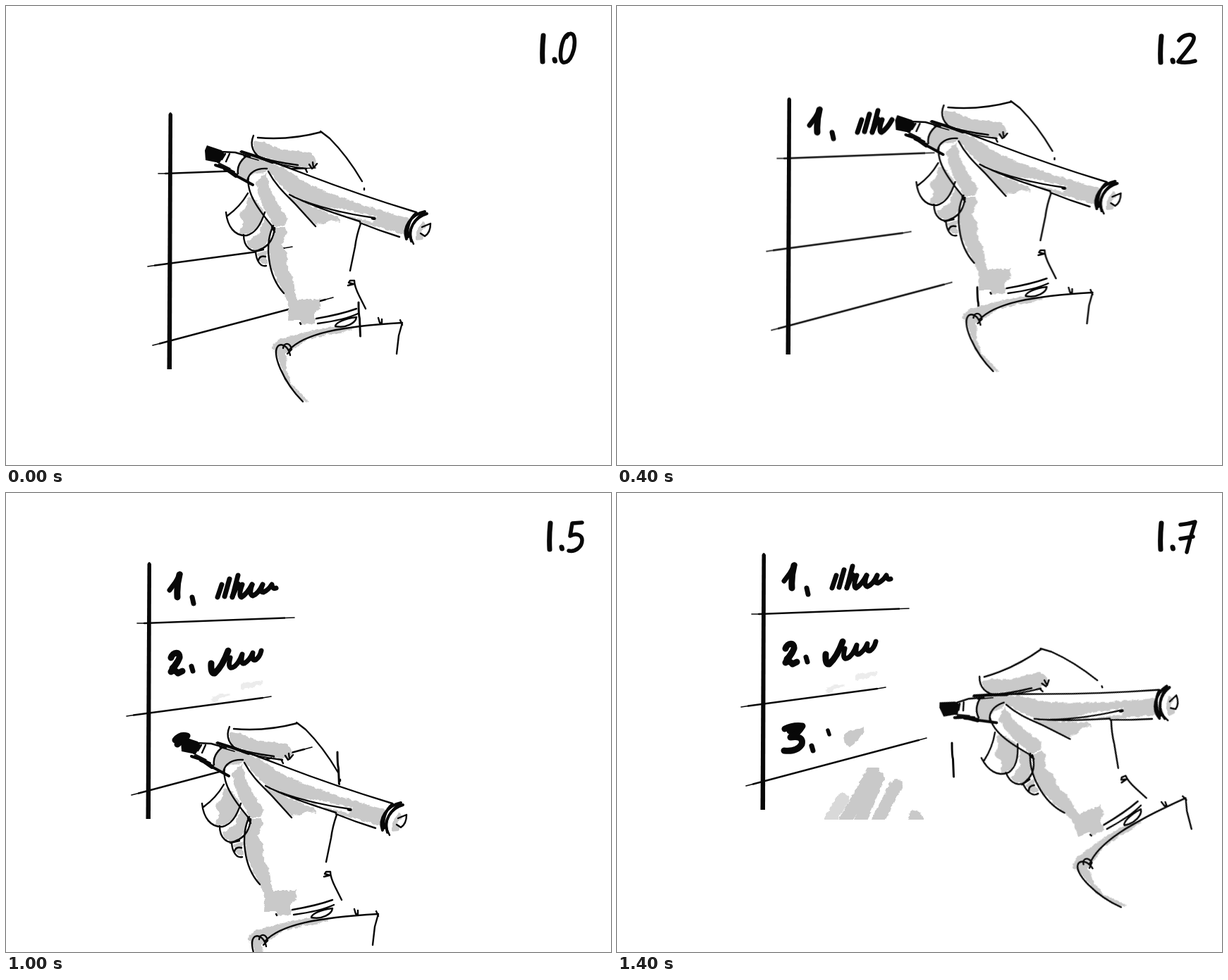
Animation of 858 by 652 pixels, one loop 1.6 s. Source, as an HTML page:

```html
<!DOCTYPE html>
<html lang="en">
<head>
<meta charset="utf-8">
<title>Writing hand</title>
<style>
html, body { margin: 0; width: 100%; height: 100%; overflow: hidden; background: #fff; }
svg { display: block; width: 858px; height: 652px; }
path { fill: none; stroke: #080808; stroke-width: 2.4; stroke-linecap: round; stroke-linejoin: round; }
.ink { fill: #080808; stroke: none; }
.paper { fill: #fff; stroke: none; }
.grey path { fill: #c9c9c9; stroke: none; }
.grey .pale { fill: #ececec; }
.smear path { stroke: #c9c9c9; stroke-width: 18; }
.smear .light { stroke: #d9d9d9; }
.brush path { stroke-width: 7; }
.brush .bold { stroke-width: 9; }
.brush .fine { stroke-width: 5.5; }
.thin { stroke-width: 1.6; }
.thick { stroke-width: 4; }

#table, #hand, #digits g, .s1, .s2, .s3, .s4, .s5, .s6 { animation: 1600ms step-end infinite; }
#table { animation-name: table; }
#hand { animation-name: hand; }
#digits g { opacity: 0; animation-name: digit; animation-delay: calc(var(--i) * 200ms); }
.s1 { animation-name: on1; }
.s2 { animation-name: on2; }
.s3 { animation-name: on3; }
.s4 { animation-name: on4; }
.s5 { animation-name: on5; }
.s6 { animation-name: on6; }
#lead { animation: lead 1600ms step-end infinite; }

@keyframes table {
  0% { transform: translate(1px, 53px); }
  12.5% { transform: translate(22px, 32px); }
  25% { transform: translate(12px, 31.5px); }
  37.5% { transform: translate(-46px, 32px); }
  50% { transform: translate(0, 0); }
  62.5% { transform: translate(-29px, 0); }
  75% { transform: translate(43px, -13.5px); }
  87.5%, 100% { transform: translate(-24px, -13px); }
}
@keyframes hand {
  0% { transform: translate(0, 0); }
  12.5% { transform: translate(12px, -36px); }
  25% { transform: translate(112.5px, -43px); }
  37.5% { transform: translate(-55px, 67px); }
  50% { transform: translate(103.5px, 34.5px); }
  62.5% { transform: translate(-34px, 148px); }
  75% { transform: translate(74px, 213.3px) rotate(-21deg); }
  87.5%, 100% { transform: translate(120.5px, 214.6px) rotate(-21deg); }
}
@keyframes lead {
  0% { transform: translate(-10px, -1px); }
  12.5%, 100% { transform: translate(0, 0); }
}
@keyframes digit { 0% { opacity: 1; } 12.5%, 100% { opacity: 0; } }
@keyframes on1 { 0% { opacity: 0; } 12.5%, 100% { opacity: 1; } }
@keyframes on2 { 0% { opacity: 0; } 25%, 100% { opacity: 1; } }
@keyframes on3 { 0% { opacity: 0; } 37.5%, 100% { opacity: 1; } }
@keyframes on4 { 0% { opacity: 0; } 50%, 100% { opacity: 1; } }
@keyframes on5 { 0% { opacity: 0; } 62.5%, 100% { opacity: 1; } }
@keyframes on6 { 0% { opacity: 0; } 75%, 100% { opacity: 1; } }
</style>
</head>
<body>
<svg viewBox="0 0 858 652">
  <defs>
    <filter id="rough" x="-5%" y="-5%" width="110%" height="110%">
      <feTurbulence type="fractalNoise" baseFrequency=".16" numOctaves="2" seed="4"/>
      <feDisplacementMap in="SourceGraphic" scale="6" xChannelSelector="R" yChannelSelector="G"/>
    </filter>
    <clipPath id="crop"><rect x="300" y="380" width="180" height="97"/></clipPath>
  </defs>

  <!-- version label -->
  <g class="brush">
    <g id="lead">
      <path d="M772 43Q770 62 771 80"/>
      <path d="M788 77L788.500 79"/>
    </g>
    <g id="digits">
      <g style="--i:0"><path class="fine" d="M797 40C787 46 783 78 790 80C801 82 808 60 806 46C805 38 799 37 795 44"/></g>
      <g style="--i:1"><path d="M804 42Q802 62 803 80"/></g>
      <g style="--i:2"><path class="fine" d="M797 49C802 41 815 38 818 44C820 53 803 68 796 79Q806 82 820 78"/></g>
      <g style="--i:3"><path class="fine" d="M798 46C804 40 817 38 818 44C818 52 808 58 803 60C814 58 820 65 815 74C810 83 800 85 795 80"/></g>
      <g style="--i:4"><path class="fine" d="M803 40Q798 55 795 68Q806 69 819 66M817 41Q812 60 810 84"/></g>
      <g style="--i:5"><path class="fine" d="M817 42L803 43L800 61C809 56 817 60 817 67C817 77 807 84 798 82"/></g>
      <g style="--i:6"><path class="fine" d="M812 34C800 45 794 62 796 73C798 83 808 82 814 74C820 65 815 57 808 60Q801 63 798 71"/></g>
      <g style="--i:7"><path class="fine" d="M799 45Q810 44 820 41Q813 62 808 84M799 65L817 62"/></g>
    </g>
  </g>

  <g id="table">
    <g class="grey" filter="url(#rough)">
      <path class="pale s5" d="M319 293L328 287L346 284L344 288L331 292L326 297ZM362 272L374 269L393 266L394 272L380 276L362 278Z"/>
      <path class="s6" d="M346 357L356 350L374 346L373 355L365 365L354 373L348 370Z"/>
    </g>
    <g clip-path="url(#crop)">
      <g class="smear s6" filter="url(#rough)">
        <path class="light" d="M344 448L325 480"/>
        <path d="M387 407L346 482M394 417L368 482M420 428L392 482M446 472L452 482"/>
      </g>
    </g>
    <path class="ink" d="M229.500 101Q232 95 235 101L234 463H227.500Z"/>
    <path d="M225 185L424 177.500M210 315.500L393 291M217 426.500L452 364"/>
    <path class="thin" d="M215 185H225M424 177.500L438 177M200 317L210 315.500M393 291L405 289M207 429L217 426.500M452 364L463 361"/>
    <path style="stroke-width:3" d="M499 368Q499 386 500.500 391L501.500 416"/>
    <g class="brush">
      <g class="s1">
        <path d="M261 138Q270 127 276 115"/>
        <path class="bold" d="M275 116Q271 131 272 148"/>
      </g>
      <g class="s2">
        <path d="M293 148L295 157"/>
        <path d="M329 148L335 130M339 147L346 122M350 148L358 117"/>
        <path d="M350 147L358 129M364 130Q358 146 363 148Q371 143 378 130"/>
      </g>
      <path class="s3" d="M378 130Q373 144 379 146Q387 143 393 130Q388 141 394 141Q401 138 406 130Q407 137 412 135"/>
      <path class="s3 bold" d="M263 234C266 225 276 225 275 234Q272 242 265 249"/>
      <g class="s4">
        <path class="bold" d="M272 240L263 254Q268 250 273 256L279 253"/>
        <path d="M292 246L294 253"/>
        <path class="bold" d="M320 242Q319 257 325 256Q336 246 344 224"/>
        <path d="M347 234Q343 250 350 248Q358 245 364 229Q361 244 367 242Q375 237 379 227Q377 239 383 237Q389 233 391 224"/>
      </g>
      <path class="s5 bold" d="M269 351Q276 342 286 345L272 357"/>
      <g class="s6">
        <path class="bold" d="M262 348Q275 342 287 344Q280 356 270 360Q289 357 286 370Q279 381 261 379"/>
        <path d="M300 372L302 379"/>
        <path class="fine" d="M323 350L325 356"/>
      </g>
    </g>
  </g>

  <g id="hand">
    <!-- opaque fingers and pen -->
    <path class="paper" d="M343 265L313 295Q319 325 337 327Q341 345 354 350Q357 369 368 369L374 350L381 316L439 313L372 234L345 242Z"/>
    <path class="paper" d="M304 207L342 209L440 243L583 294L598 299L602 315L580 335L567 328L500 310L402 270L372 236L345 250L300 228Z"/>

    <g class="grey" filter="url(#rough)">
      <path d="M351 191L366 194L390 203L428 208L440 216L439 225L423 231L376 218L356 212L350 204Z"/>
      <path d="M326 238L331 220L342 211L374 222L425 241L453 251L462 266L500 273L574 297L568 325L500 307L402 268L372 235L346 240L341 249Z"/>
      <path d="M354 250L369 237L375 261L389 287L400 302L393 313L380 313L364 284Z"/>
      <path d="M399 270L420 278L470 299L474 307L460 304L450 310L437 309L420 292Z"/>
      <path d="M344 270L351 272L366 291L362 311L344 325L329 324L337 307L331 296L339 288Z"/>
      <path d="M367 302L379 315L373 334L360 346L345 345L341 334L358 324Z"/>
      <path d="M357 351L370 347L370 366L361 366Z"/>
      <path d="M381 315L395 315L398 322L391 339L398 352L399 371L408 390L411 417L446 417L445 430L438 437L438 451L420 453L416 446L400 446L401 431L398 414L384 389L374 365L373 340Z"/>
      <path d="M376 484L386 474L420 464L462 456L494 457L482 462L430 473L409 486L398 493L397 514L404 536L430 563L420 561L396 532L386 500Z"/>
      <path d="M582 318L592 306L596 313L588 321L592 332L582 333Z"/>
    </g>
    <g filter="url(#rough)">
      <path class="paper" d="M396 230L440 245L576 294L572 302L520 287L460 266L425 251Z"/>
      <path class="paper" d="M459 286L490 291L526 300L520 307L482 297Z"/>
    </g>

    <!-- nib and collar -->
    <path class="ink" d="M282 205L285 198L306 205L310 210L303 223L283 219Z"/>
    <path d="M290 202L304 207L325 208L346 214M311 210L306 218M317 210L312 221M329 238Q327 224 341 213"/>
    <path class="thick" d="M297 226L309 230L326 242M302 226L323 236M310 232L327 240M319 237L350 254"/>
    <path class="thin" d="M300 222L318 231M332 207L350 213M337 213L358 219"/>
    <path class="thick" d="M334 207L353 213L378 222"/>

    <!-- barrel and cap -->
    <path d="M353 212L380 222L430 241Q500 268 582 293M402 268C425 280 460 293 502 306M407 271C440 285 480 295 523 301Q525 304 519 302M502 308Q529 319 558 328"/>
    <path class="thick" d="M594 292C574 296 562 315 568 331M597 295C579 300 569 318 575 334M582 294C571 303 568 318 570 328"/>
    <path d="M592 293C580 302 567 320 578 338M588 323L594 327Q602 322 602 309L590 314"/>

    <!-- top finger and back of the hand -->
    <path d="M351 184C345 198 350 211 366 218Q390 227 426 231M357 187Q402 191 447 179M446 178L459 188Q484 213 505 249M508 259V261"/>
    <path d="M350 212Q380 222 414 226M425 232L427 236M430 225L434 231M435 222L436 230L441 224"/>

    <!-- index finger and curled fingers -->
    <path d="M342 249C344 236 356 230 370 231M344 243C340 266 360 292 381 317M372 235C382 254 395 266 410 281L439 313"/>
    <path d="M343 266Q332 285 314 298M312 293C314 313 324 327 341 326Q358 322 367 293M337 325C337 342 348 352 360 346C374 341 380 328 381 315M354 349C355 362 361 371 369 369M358 361Q360 354 368 356M352 349L365 346"/>
    <path d="M379 312C367 337 370 382 394 408M377 314L381 321"/>

    <!-- wrist and sleeve -->
    <path d="M503 309Q497 326 495 342L488 376M485 397L493 395L486 393L488 390H494Q494 398 501 412L510 430"/>
    <path d="M440 444Q475 438 497 430M442 451Q480 446 499 437M497 442C480 444 467 450 467 455C483 458 496 450 497 442M417 450L418 452"/>
    <path d="M401 489C423 465 475 455 562 450L557 468L554 494M528 443L530 450L533 450V445M559 446L562 453"/>
    <path d="M421 562C394 535 374 491 387 482C394 479 401 486 403 496M393 486C394 478 403 477 405 488L399 494"/>
  </g>
</svg>
</body>
</html>
```
